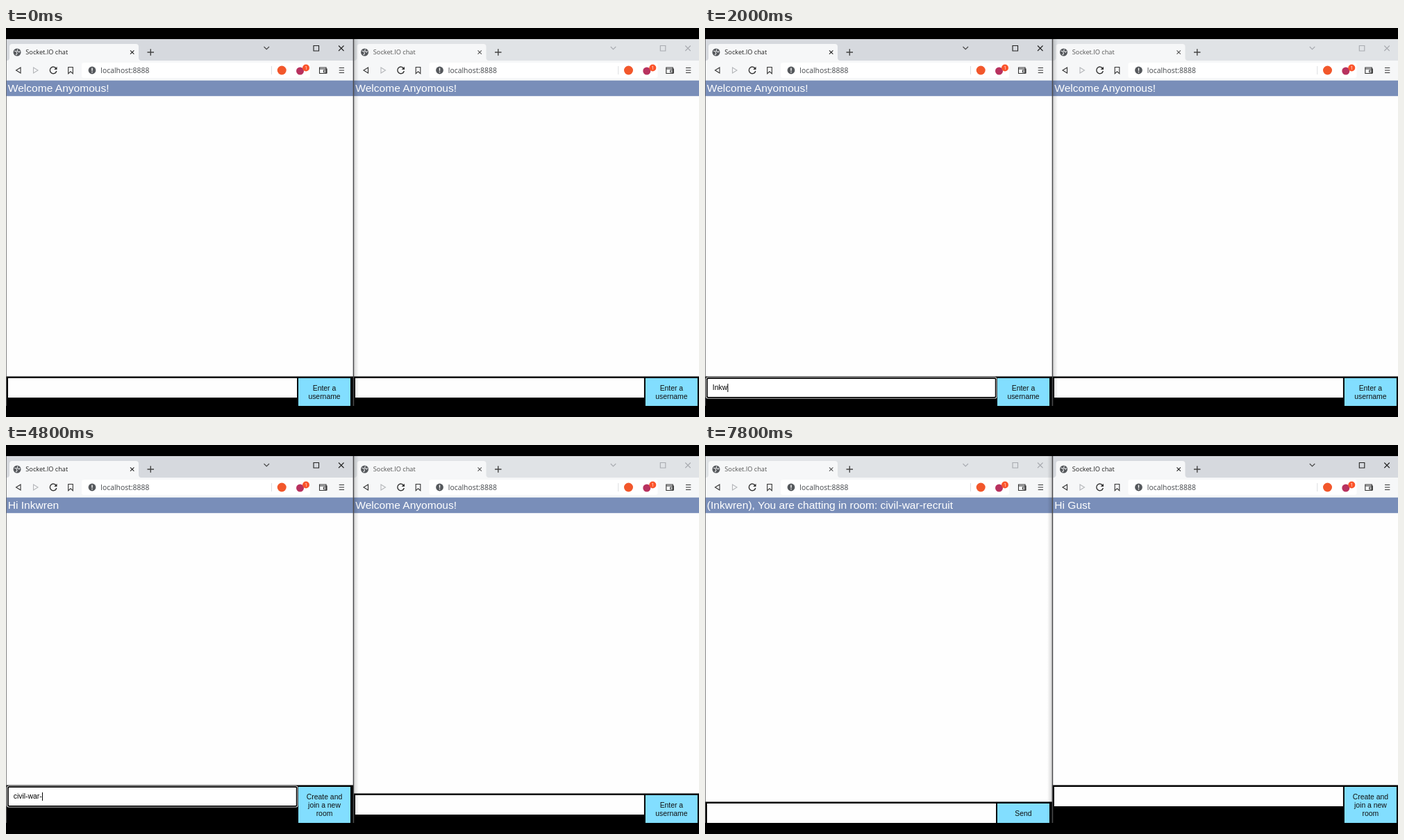
Animation, 998 px wide and 561 px high, one loop 8 s. Source, as an HTML page:

```html
<!DOCTYPE html>
<html lang="en">
<head>
<meta charset="utf-8">
<title>Socket.IO chat</title>
<style>
  html, body { margin: 0; width: 100%; height: 100%; overflow: hidden; background: #000; }
  svg { display: block; width: 998px; height: 561px; }
  text { white-space: pre; }
  .ui { font-family: "Open Sans", "Noto Sans", sans-serif; }
  .page { font-family: "Liberation Sans", Arial, sans-serif; }
  .line { fill: none; stroke-width: 1.1; }
</style>
</head>
<body>
<svg id="stage" viewBox="0 0 998 561"></svg>
<script>
const LOOP = 8000, STEP = 200, BOTTOM = 545;
const INK = '#333', FADED = '#a8abb0';
const stage = document.getElementById('stage');
const pen = document.createElement('canvas').getContext('2d');
pen.font = '10.4px "Liberation Sans", Arial, sans-serif';

const rect = (x, y, w, h, fill, extra = '') =>
  `<rect x="${x}" y="${y}" width="${w}" height="${h}" fill="${fill}" ${extra}/>`;
const disc = (x, y, r, fill) => `<circle cx="${x}" cy="${y}" r="${r}" fill="${fill}"/>`;
const line = (d, stroke, extra = '') => `<path class="line" d="${d}" stroke="${stroke}" ${extra}/>`;
const label = (x, y, size, fill, words, kind = 'page', anchor = 'start') =>
  `<text class="${kind}" x="${x}" y="${y}" font-size="${size}" fill="${fill}" text-anchor="${anchor}">${words}</text>`;

function tabStrip(active) {
  const tone = active ? '#222' : '#555';
  return rect(0, 16, 500, 31, active ? '#d6d9de' : '#e0e3e6') +
    `<path d="M2 47Q5 46 5 43V27Q5 23 9 23H187Q191 23 191 27V43Q191 46 194 47Z" fill="#f6f7f8"/>` +
    disc(16, 35, 5.5, '#55585c') +
    line('M12 33L15 34L16 37L14 39M17 30.5L16 33L19 35L20 33', '#e4e5e7') +
    label(28.3, 38.3, 9.2, tone, 'Socket.IO chat', 'ui') +
    line('M179 32.3L184.4 37.7M184.4 32.3L179 37.7', tone) +
    line('M203.5 35H213M208.3 30.3V39.7', '#444', 'style="stroke-width:1.4"');
}

function windowButtons(active) {
  const tone = active ? '#222' : FADED;
  return line('M371.5 27L375.2 30.7L379 27', active ? '#444' : FADED) +
    line('M443 25.5H450.5V33H443Z', tone) +
    line('M479 25.5L486.5 33M486.5 25.5L479 33', tone);
}

function toolbarLeft() {
  return rect(0, 47, 500, 29, '#f6f7f8') +
    rect(109, 50, 329, 22, '#fff', 'rx="3"') +
    line('M21 57V65L14.5 61Z', INK) +
    line('M39.5 57V65L46 61Z', '#b5b7ba') +
    line('M72.3 58.5A4.8 4.8 0 1 0 72.8 62', INK, 'style="stroke-width:1.4"') +
    `<path d="M73.5 55.7V60H69.2Z" fill="${INK}"/>` +
    line('M89.7 56.5H96.3V65.8L93 62.8L89.7 65.8Z', INK) +
    disc(124, 61, 5.4, '#55585c') +
    rect(123.3, 57.6, 1.4, 4.2, '#fff') + rect(123.3, 62.9, 1.4, 1.4, '#fff') +
    label(136.3, 65, 10.4, '#44474b', 'localhost:8888', 'ui');
}

function toolbarRight() {
  return rect(382, 55, 1, 12, '#dcdde0') +
    disc(397.2, 61, 6.5, '#f2572b') +
    disc(423.5, 62, 5.5, '#b8325f') +
    disc(432, 57.5, 5, '#fb542b') +
    label(432, 60, 6.5, '#fff', '1', 'ui', 'middle') +
    line('M451.5 57H461V65.5H451.5ZM451.5 59H462V65.5M462 61H457.5V63.8H462', INK) +
    line('M479.7 57.5H487M479.7 61H487M479.7 64.5H487', INK);
}

function form({ button, focused, typed = '', caret }) {
  const height = button.length * 12 + 16, top = BOTTOM - height;
  const middle = top + height / 2 + 3.6;
  let out = rect(0, top - 2.5, 500, height + 2.5, '#000');
  if (focused) {
    out += rect(1.3, top - 1.6, 419, 31.2, '#fff', 'rx="2.5"') +
      rect(2.2, top - .7, 417.2, 29.4, '#000', 'rx="2"') +
      rect(3.8, top + .9, 414, 26.2, '#fff', 'rx="1"');
  } else {
    out += rect(3, top, 416, 28, '#fefefe');
  }
  out += label(10.8, top + 17.4, 10.4, '#000', typed);
  if (focused && caret) out += rect(11 + pen.measureText(typed).width, top + 8, 1, 12, '#000');
  out += rect(421, top, 75, height, '#82deff');
  button.forEach((words, i) => {
    out += label(458.5, middle + 12 * (i - (button.length - 1) / 2), 10.4, '#111', words, 'page', 'middle');
  });
  return out;
}

function browser(x, inset, active, chat) {
  return `<g transform="translate(${x} 0)">` +
    rect(0, 16, 500, BOTTOM - 16, '#fefefe') + tabStrip(active) + toolbarLeft() +
    `<g transform="translate(${-inset} 0)">${windowButtons(active)}${toolbarRight()}</g>` +
    rect(0, 75.7, 500, 22.5, '#798eb9') +
    label(2.8, 92.3, 15.55, '#fff', chat.title) +
    `<g transform="translate(${-inset / 2} 0)">${form(chat)}</g></g>`;
}

const NAMING = ['Enter a', 'username'];
const JOINING = ['Create and', 'join a new', 'room'];
const WELCOME = 'Welcome Anyomous!';
const HERO = 'Inkwren', GUEST = 'Gust', ROOM = 'civil-war-recruit';

const type = (words, start, pace, t) => words.slice(0, Math.max(0, Math.floor((t - start) / pace)));

// The caret blinks from the moment of focus and stays lit while typing.
function entry(t, focusAt, words, start, pace) {
  const typed = type(words, start, pace, t);
  const typing = typed && typed.length < words.length;
  return { focused: t >= focusAt, typed, caret: typing || (t - focusAt) % 1060 < 530 };
}

function hostChat(t) {
  if (t < 2600) return { title: WELCOME, button: NAMING, ...entry(t, 800, HERO, 1400, 130) };
  if (t < 5800) return { title: 'Hi ' + HERO, button: JOINING, ...entry(t, 3400, ROOM, 3800, 100) };
  return { title: `(${HERO}), You are chatting in room: ${ROOM}`, button: ['Send'] };
}

function guestChat(t) {
  if (t < 7800) return { title: WELCOME, button: NAMING, ...entry(t, 6800, GUEST, 7000, 130) };
  return { title: 'Hi ' + GUEST, button: JOINING };
}

function scene(t) {
  const hostActive = t < 6600;
  const shadowX = hostActive ? 501 : 493;
  return `<defs><linearGradient id="shade" x1="${hostActive ? 0 : 1}" x2="${hostActive ? 1 : 0}">
      <stop stop-opacity=".16"/><stop offset="1" stop-opacity="0"/></linearGradient></defs>` +
    rect(0, 0, 998, 561, '#000') +
    browser(0, 0, hostActive, hostChat(t)) +
    browser(500.5, 1.2, !hostActive, guestChat(t)) +
    rect(shadowX, 16, 7, BOTTOM - 16, 'url(#shade)') +
    rect(0, 16, .8, BOTTOM - 16, '#666') +
    rect(499.7, 16, 1.5, BOTTOM - 16, '#4a4a4c');
}

let shown = -1;
function play(now) {
  const t = Math.floor((now % LOOP) / STEP) * STEP;
  if (t !== shown) stage.innerHTML = scene(shown = t);
  requestAnimationFrame(play);
}
play(performance.now());
</script>
</body>
</html>
```
